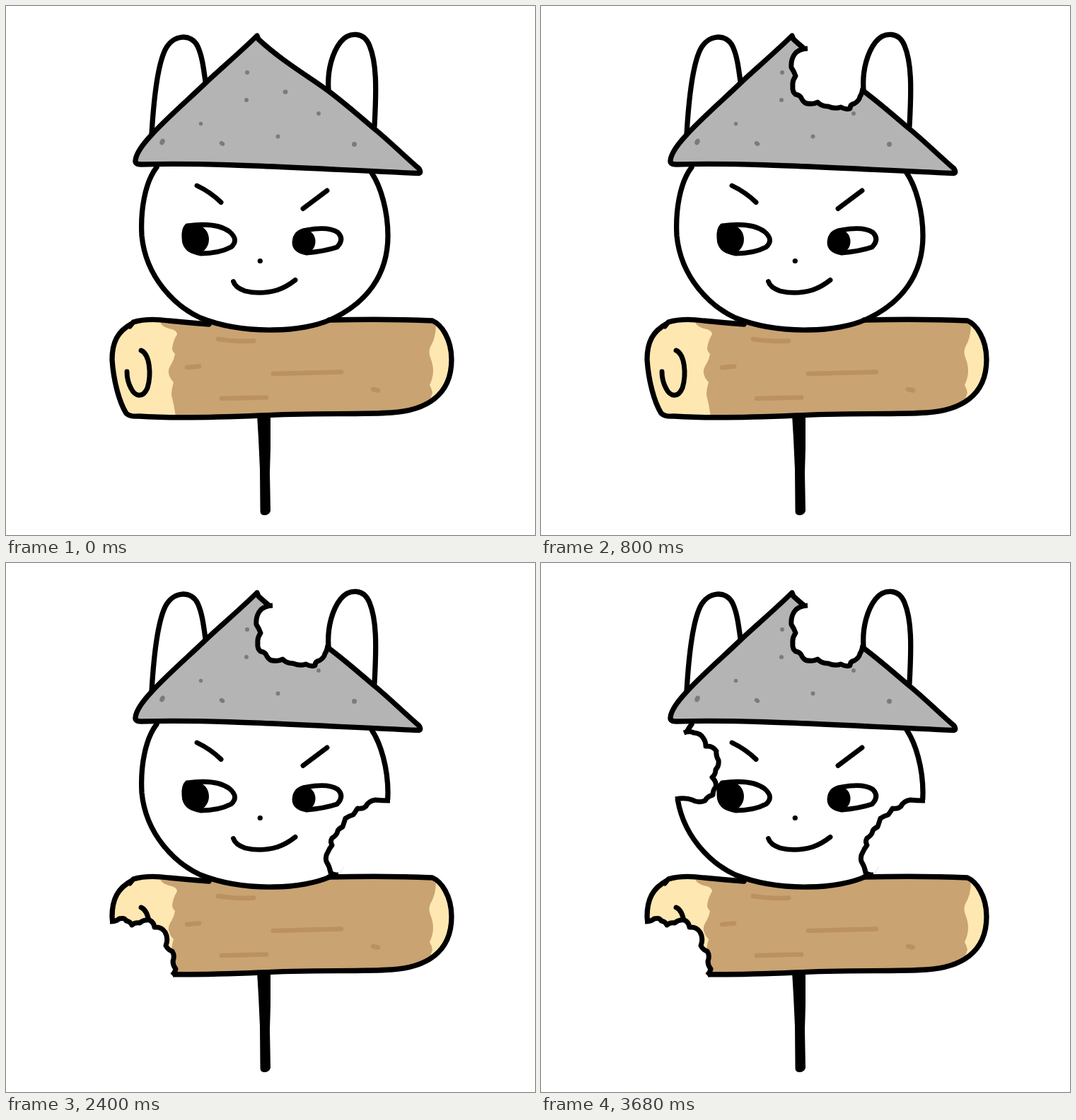
Write an HTML page that moves like this. It is 748 by 748 pixels and loops after 4 s.

```html
<!DOCTYPE html>
<html lang="en">
<head>
<meta charset="utf-8">
<title>Snack skewer</title>
<style>
  html, body { margin: 0; width: 100%; height: 100%; overflow: hidden; background: #fff; }
  svg { display: block; width: 100vw; height: 100vh; }
  .ink { fill: none; stroke: #000; stroke-width: 7.3; stroke-linecap: round; stroke-linejoin: round; }
  .face { stroke-width: 6.9; }
  .bite path { fill: #fff; stroke: #000; stroke-width: 7; stroke-linejoin: round; }
  .bite polygon { fill: #fff; }
  .grain { fill: none; stroke: #bb9160; stroke-width: 6.6; stroke-linecap: round; }
  .bite { animation: 4s step-end infinite; }
  .hat { animation-name: first; }
  .log { animation-name: second; }
  .cheek { animation-name: third; }
  .temple { animation-name: fourth; }
  @keyframes first  { 0% { opacity: 0 } 20% { opacity: 1 } 100% { opacity: 1 } }
  @keyframes second { 0% { opacity: 0 } 40% { opacity: 1 } 100% { opacity: 1 } }
  @keyframes third  { 0% { opacity: 0 } 60% { opacity: 1 } 100% { opacity: 1 } }
  @keyframes fourth { 0% { opacity: 0 } 80% { opacity: 1 } 100% { opacity: 1 } }
</style>
</head>
<body>
<svg viewBox="0 0 748 748">
  <!-- stick -->
  <path d="M355 578H374L374 625L373 660L374 714Q372 720 365 720Q359 720 359.500 713L359 655L357 612Z"/>

  <!-- log body -->
  <path fill="#ffe7b2" d="M178 449C158 460 150 475 150 500C152 530 160 560 170 576Q175 581 188 580C230 583 290 582 360 579C430 575 500 578 545 575C592 572 630 552 630 500C630 470 615 450 603 445L457 444L287 450L230 445Q200 441 178 449Z"/>
  <path fill="#c9a372" d="M218 447Q220 453 230 456Q242 458 242 464Q236 474 235 484Q235 488 239 492Q238 499 234 506Q229 513 230 519Q231 526 237 532Q234 542 234 550Q238 565 240 581Q300 582 360 579C430 575 500 578 545 575Q580 571 600 560Q600 553 603 547Q602 541 599 536Q604 525 604 516Q604 507 600 497Q597 489 600 482Q608 469 608 450L603 445L457 444L287 450Z"/>
  <path class="grain" d="M300 471Q328 475 350 473.500M256 511L273 509.500M378 520L474 517.500M305 555L368 553.500M519 542L526 543.500"/>

  <!-- head -->
  <path class="ink" style="fill:#fff" d="M213 228C196 250 190 290 192 325C198 385 240 425 275 441C310 455 345 458.500 378 458C410 458 440 452 460 443C510 420 540 380 540 325C540 290 530 255 517 236"/>
  <g class="bite cheek">
    <polygon points="541,335 560,335 560,441 470,441"/>
    <path d="M543 336Q531 336 522 335Q512 337 509 344Q505 348 497 347Q494 352 491 356Q484 358 480 361Q478 367 476 373Q470 376 469 379Q468 385 461 389Q458 394 461 399Q457 404 455 409Q451 415 453 422Q458 430 459 438Q463 441 470 441"/>
  </g>
  <g class="bite temple">
    <polygon points="204,239 180,239 180,334 192,334"/>
    <path d="M202 240Q210 237 216 240Q226 241 229 247Q233 252 233 259Q243 258 248 266Q247 272 251 279Q252 287 247 292Q247 299 242 303Q249 310 247 317Q243 321 243 328Q235 330 232 336Q222 340 214 335Q204 331 190 334"/>
  </g>

  <!-- face -->
  <g class="ink face">
    <path d="M270 254Q289 263 304 277.500M454 261L420 286.500"/>
    <path d="M256 311Q297 305 316 319Q330 331 318 341Q301 350 275 350Q252 345 252 328Q251 316 256 311Z"/>
    <path d="M408 334Q409 319 425 317Q455 311 469 320Q479 330 468 341Q450 347 425 349Q408 346 408 334Z"/>
    <path d="M321.500 389.500Q324 398 338 403Q361 408.500 384 401.500Q397 397 409 387.500"/>
  </g>
  <ellipse cx="268" cy="330" rx="19" ry="20.500"/>
  <ellipse cx="422" cy="333" rx="15.500" ry="17"/>
  <circle cx="359.300" cy="360.500" r="3.600"/>

  <!-- log outline -->
  <path class="ink" d="M175 453L180 447Q200 441 230 445Q260 448 287 450M178 449C158 460 150 475 150 500C152 530 160 560 170 576Q175 581 188 580C230 583 290 582 360 579C430 575 500 578 545 575C592 572 630 552 630 500C630 470 615 450 603 445C560 443 500 443 457 444"/>
  <path class="ink face" d="M191 487C203 492 206 520 200 540C193 556 182 551 177 541C172 532 171 525 171 517"/>
  <g class="bite log">
    <polygon points="150,507 140,507 140,592 236,592 236,582"/>
    <path d="M147 507Q156 507 160 503Q168 501 170 506Q176 507 178 512Q182 508 189 509Q195 504 203 505Q209 508 210 515Q220 514 225 522Q230 531 226 541Q229 547 235 549Q239 555 236 563Q236 569 240 574Q239 579 235 583"/>
  </g>

  <!-- hat -->
  <path class="ink" style="fill:#b4b4b4" d="M355 42C325 71 302 90 282 109C256 134 228 158 206 182C191 198 184 210 183 218Q182 224 191 224C290 221 410 229 583 236.500Q588 236 584 230C563 212 540 189 520 173C498 154 477 136 457 121C432 102 390 78 357 47Z"/>
  <g fill="#7b7b7b">
    <circle cx="341" cy="94" r="3"/>
    <circle cx="395" cy="121.500" r="3.300"/>
    <circle cx="340" cy="133" r="3"/>
    <circle cx="442" cy="152" r="2.900"/>
    <circle cx="275.500" cy="166.500" r="2.700"/>
    <circle cx="384.500" cy="184.500" r="3"/>
    <circle cx="492.500" cy="195.500" r="3.500"/>
    <ellipse cx="221" cy="192" rx="3.400" ry="4.700" transform="rotate(25 221 192)"/>
    <ellipse cx="305.500" cy="194.500" rx="4" ry="3" transform="rotate(35 305.500 194.500)"/>
  </g>
  <g class="bite hat">
    <polygon points="375,60 382,50 465,110 455,119"/>
    <path d="M377 60Q363 61 358 69Q353 77 354 87Q358 93 360 99Q355 106 356 113Q355 121 360 125Q367 126 369 132Q373 139 380 138Q386 139 391 136Q397 142 406 142Q416 146 424 143Q431 147 437 145Q437 139 443 138Q450 134 451 128Q454 124 455 116"/>
  </g>

  <!-- ears -->
  <path class="ink" d="M206 181C209 130 214 85 225 62C236 40 262 38 271 57C277 70 279 85 282 107M456 118C454 90 462 65 473 51C485 36 506 36 514 56C524 80 524 115 521 170"/>
</svg>
</body>
</html>
```
